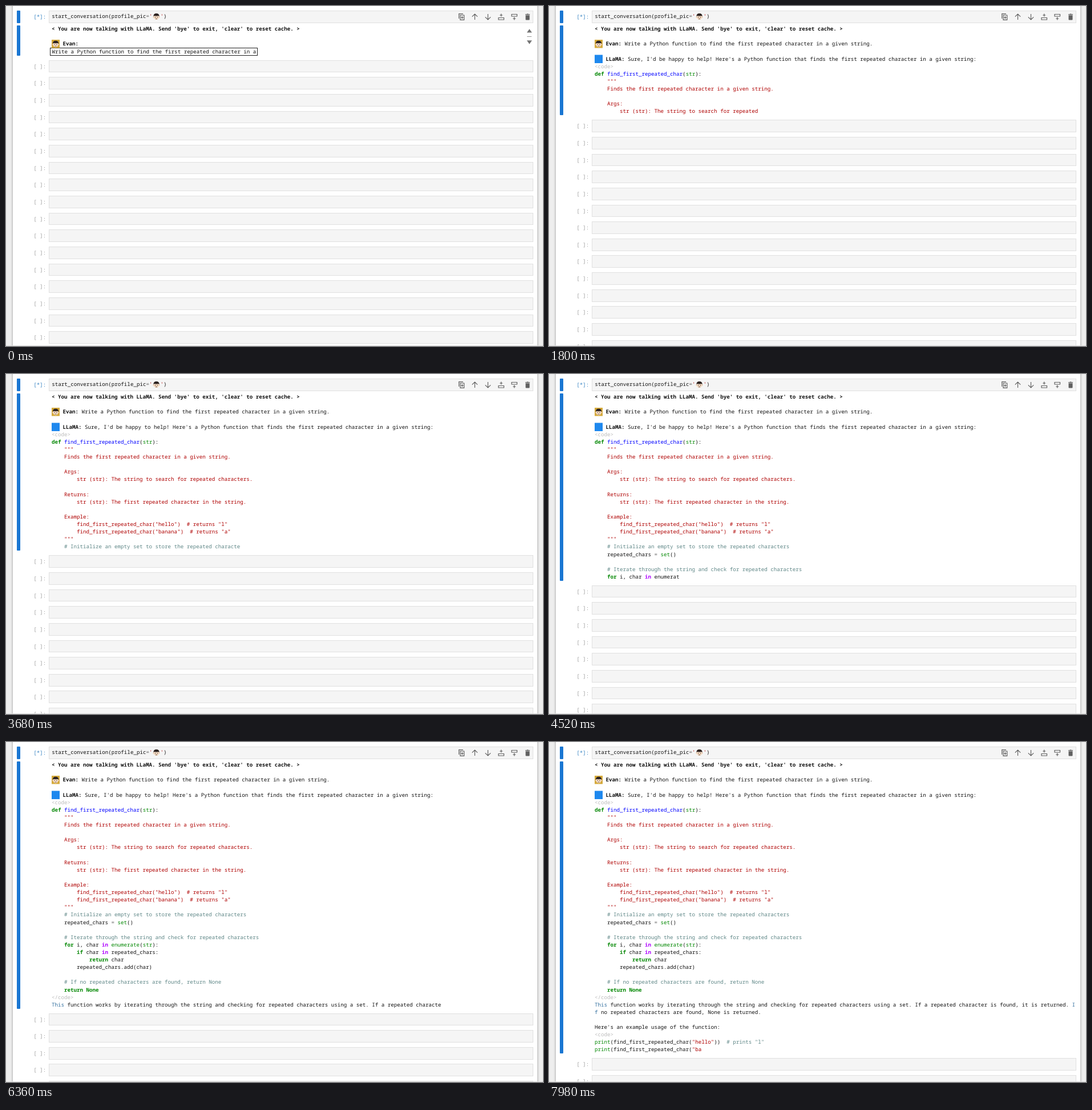
These frames come from a looping animation (941x595 px, 8000 ms). An HTML page:

```html
<!DOCTYPE html>
<html lang="en">
<head>
<meta charset="utf-8">
<title>Notebook chat</title>
<style>
html, body { margin: 0; width: 100%; height: 100%; overflow: hidden; background: #eee; }
#stage { position: relative; width: 941px; height: 595px; overflow: hidden;
  font: 9.18px/13.11px "Noto Sans Mono", monospace; color: #141414;
  text-rendering: geometricPrecision; font-variant-ligatures: none; }
#stage div, #stage pre, #stage svg { position: absolute; margin: 0; box-sizing: border-box; }
pre { font: inherit; white-space: pre; }
#page { left: 12px; top: -10px; width: 919px; height: 620px; background: #fff; box-shadow: 0 0 4px #0006; }
#edge { left: 0; top: 594px; width: 941px; height: 1px; background: #e0e0e0; }
.bar { left: 19px; width: 6px; background: #1976d2; border-radius: 1px; }
.cell { left: 0; width: 941px; height: 21.7px; line-height: 21.7px; }
.cell .prompt { left: 48.3px; color: #9c9c9c; white-space: pre; }
.cell .box { left: 75px; width: 849px; height: 21.7px; padding-left: 4.3px;
  background: #f5f5f5; border: 1px solid #e0e0e0; line-height: 18.7px; white-space: pre; }
.cell.active .prompt { color: #307fc1; }
#text { left: 80px; top: 33.25px; }
.name { padding-left: 19.5px; font-weight: bold; }
#input { left: 77px; top: 73px; width: 364px; height: 14px; padding-left: 2.5px; overflow: hidden;
  border: 1.5px solid #222; line-height: 11px; white-space: pre; background: #fff; }
#cells { left: 0; width: 941px; height: 600px; }
.str { color: #af0000; } .com { color: #5f8787; } .key { color: #008700; font-weight: bold; }
.op { color: #af00ff; font-weight: bold; } .fn { color: #008700; } .def { color: #00f; }
.eq { color: #666; } .tag { color: #bcbcbc; } .hint { color: #33709f; }
</style>
</head>
<body>
<div id="stage">
  <div id="page"></div>
  <div class="bar" style="top:8px;height:22px"></div>
  <div class="bar" id="bar" style="top:34px"></div>
  <div class="cell active" style="top:8px">
    <div class="prompt">[*]:</div>
    <div class="box">start_conversation(profile_pic<span class="eq">=</span><span class="str">'</span><span style="padding-left:14px" class="str">'</span>)</div>
  </div>
  <pre id="text"></pre>
  <div id="input">Write a Python function to find the first repeated character in a</div>
  <div id="cells"></div>
  <svg width="941" height="595" fill="none" stroke="#616161" stroke-width="1.2">
    <symbol id="face" viewBox="0 0 14 14" stroke="none">
      <circle cx="2.3" cy="8" r="1.2" fill="#e9c3a2"/><circle cx="11.7" cy="8" r="1.2" fill="#e9c3a2"/>
      <ellipse cx="7" cy="7.8" rx="4.6" ry="4.9" fill="#f5dcc4"/>
      <path d="M2 7Q1.5 1.5 7 1.5T12 7L10.5 5.5Q7 6.5 3.5 5.5Z" fill="#2b211f"/>
      <path d="M4.6 7.5h1.2v1.3h-1.2zM8.2 7.5h1.2v1.3h-1.2zM5.5 10.5h3v.7h-3z" fill="#4a3430"/>
    </symbol>
    <use href="#face" x="256.5" y="11.5" width="14" height="14"/>
    <rect x="80" y="59" width="14" height="14.5" fill="#d4a93a" stroke="none"/>
    <use href="#face" x="80" y="59.3" width="14" height="14"/>
    <rect id="bot" x="80" y="85.5" width="14" height="14.5" fill="#1e88ee" stroke="none"/>
    <path d="M793.7 22V13.7H801M796 16h6.7v8.4h-6.7zM799.4 18v4.4M797.2 20.2h4.4"/>
    <path d="M821.5 24V14M816.8 18.7l4.7-4.7 4.7 4.7M844.5 14V24M839.8 19.3l4.7 4.7 4.7-4.7"/>
    <path d="M863 20.5h9.5v3.5h-9.5zM867.7 13.5v5M865.2 16h5M886 14.5h9.5v3.5h-9.5zM890.7 19.5v5M888.2 22h5"/>
    <path d="M910.5 16.3h7v7.2q0 1-1 1h-5q-1 0-1-1zM910 14.2h2.3l.7-.8h2l.7.8h2.3v1.2h-8z" fill="#616161" stroke="none"/>
    <g id="spinner" stroke="none" fill="#757575">
      <path d="M912.7 46.5l4.5-6.3 4.5 6.3zM912.7 60.3h9l-4.5 6.5zM913 53h8v.8h-8z"/>
    </g>
  </svg>
  <div id="edge"></div>
</div>
<script>
const ROW = 13.11, TOP = 33.9, LOOP = 8000, TICK = 20;
const $ = id => document.getElementById(id);

const reply = `Sure, I'd be happy to help! Here's a Python function that finds the first repeated character in a given string:
<code>
def find_first_repeated_char(str):
    """
    Finds the first repeated character in a given string.

    Args:
        str (str): The string to search for repeated characters.

    Returns:
        str (str): The first repeated character in the string.

    Example:
        find_first_repeated_char("hello")  # returns "l"
        find_first_repeated_char("banana")  # returns "a"
    """
    # Initialize an empty set to store the repeated characters
    repeated_chars = set()

    # Iterate through the string and check for repeated characters
    for i, char in enumerate(str):
        if char in repeated_chars:
            return char
        repeated_chars.add(char)

    # If no repeated characters are found, return None
    return None
</code>
This function works by iterating through the string and checking for repeated characters using a set. If a repeated character is found, it is returned. I
f no repeated characters are found, None is returned.

Here's an example usage of the function:
<code>
print(find_first_repeated_char("hello"))  # prints "l"
print(find_first_repeated_char("ba`;

// Typing pace: time in ms, line and column reached
const lines = reply.split("\n");
const pace = [
  [220, 0, 0], [980, 2, 22], [1860, 7, 63], [2720, 13, 41], [4520, 20, 27],
  [5560, 26, 4], [7120, 33, 4], [7660, 34, 0], [7980, 34, 34]
].map(([ms, line, col]) => [ms, lines.slice(0, line).join("\n").length + (line ? 1 : 0) + col]);

function typedCount(t) {
  if (t <= pace[0][0]) return 0;
  const i = pace.findIndex(p => t <= p[0]);
  if (i < 0) return reply.length;
  const [t0, n0] = pace[i - 1], [t1, n1] = pace[i];
  return Math.round(n0 + (n1 - n0) * (t - t0) / (t1 - t0));
}

const esc = s => s.replace(/&/g, "&amp;").replace(/</g, "&lt;");
const span = (cls, s) => `<span class="${cls}">${esc(s)}</span>`;
const syntax = /("""[^]*?(?:"""|$)|"[^"\n]*"?)|(#.*)|\b(def|for|if|return|None)\b|\b(in)\b|\b(print|set|enumerate|str)\b|((?<=def )\w+)|(=)/g;
const kinds = ["str", "com", "key", "op", "fn", "def", "eq"];

function paint(s, rule, pick) {
  let html = "", at = 0;
  for (const m of s.matchAll(rule)) {
    html += esc(s.slice(at, m.index)) + span(pick(m), m[0]);
    at = m.index + m[0].length;
  }
  return html + esc(s.slice(at));
}

const code = s => paint(s, syntax, m => kinds[m.slice(1).findIndex(g => g !== undefined)]);
const prose = s => paint(s, /^This|\bI(?=\n|$)|^f(?= no)/gm, () => "hint");

function markup(s) {
  let inCode = false;
  return s.split(/(<\/?code>)/).map((part, i) => {
    if (i % 2) {
      inCode = part === "<code>";
      return span("tag", part);
    }
    return inCode ? code(part) : prose(part);
  }).join("");
}

$("cells").innerHTML = Array.from({ length: 18 }, (_, i) =>
  `<div class="cell" style="top:${i * 29.66}px"><div class="prompt">[ ]:</div><div class="box"></div></div>`).join("");

function draw(t) {
  const asking = t < 20, answering = t >= 60;
  const typed = reply.slice(0, typedCount(t));
  const rows = answering ? 4 + typed.split("\n").length : 3;
  const bottom = asking ? 86.7 : TOP + rows * ROW;

  let html = "<b>&lt; You are now talking with LLaMA. Send 'bye' to exit, 'clear' to reset cache. &gt;</b>\n\n" + span("name", "Evan:");
  if (!asking) html += " Write a Python function to find the first repeated character in a given string.";
  if (answering) html += "\n\n" + span("name", "LLaMA:") + " " + markup(typed);
  $("text").innerHTML = html;

  $("input").style.display = $("spinner").style.display = asking ? "" : "none";
  $("bot").style.display = answering ? "" : "none";
  $("bar").style.height = bottom - 34 + "px";
  $("cells").style.top = bottom + 8 + "px";
}

const start = performance.now();
function frame() {
  const t = (performance.now() - start) % LOOP;
  draw(Math.floor(t / TICK) * TICK);
  requestAnimationFrame(frame);
}
frame();
</script>
</body>
</html>
```
